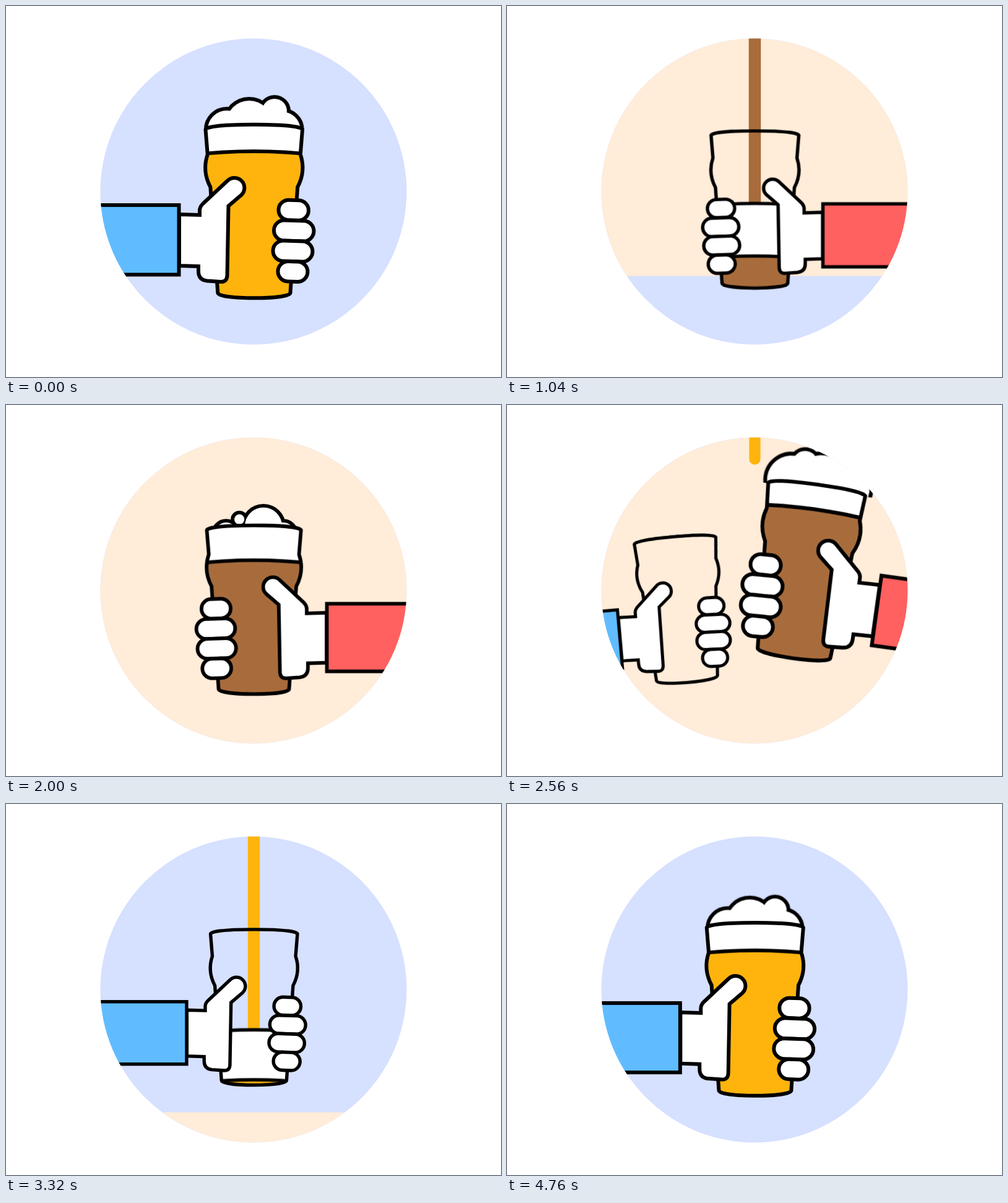
An HTML page without scripts for the animation above (4.8 s loop, 800x600 px).

```html
<!DOCTYPE html>
<html lang="en">
<head>
<meta charset="utf-8">
<title>Pouring two beers</title>
<style>
  html, body { margin: 0; width: 100%; height: 100%; overflow: hidden; background: #fff; }
  svg { display: block; width: 100vw; height: 100vh; }

  .amber { --drink: #feb40d; --sleeve: #60bcff; }
  .brown { --drink: #a86c3c; --sleeve: #ff6060; }

  .backdrop, .round, .grow, .stream, .foam, .liquid, .fingers, circle {
    animation: 4800ms linear infinite;
  }
  /* the amber beer runs half a loop ahead */
  .amber, .amber * { animation-delay: -2400ms !important; }

  .ink { stroke: #000; stroke-width: 6; }
  .skin { fill: #fff; }
  .sleeve { fill: var(--sleeve); }

  .backdrop { animation-name: wipe; }
  .grow { transform-origin: 400.5px 300px; animation-name: grow; }
  .round { transform-origin: 400.5px 300px; animation-name: round; }
  .fingers { animation-name: grip; }
  .stream {
    fill: none; stroke: var(--drink); stroke-width: 21.6; stroke-linecap: round;
    stroke-dasharray: 475 1200; animation-name: pour;
  }
  .foam { fill: #fff; animation-name: foam; }
  .liquid { fill: var(--drink); animation-name: liquid; }
  .edge { fill: #000; stroke: #000; stroke-width: 12; }
  .froth { fill: #fff; }
  .b1 { animation-name: b1; }
  .b2 { animation-name: b2; }
  .b3 { animation-name: b3; }
  .b4 { animation-name: b4; }

  @keyframes wipe {
    0% { transform: translateY(-496px); }
    13.354% { transform: translateY(-496px); animation-timing-function: cubic-bezier(.4, 0, .2, 1); }
    30.02%  { transform: none; }
    58.625% { transform: none; animation-timing-function: cubic-bezier(.4, 0, .2, 1); }
    75.29%, 100% { transform: translateY(496px); }
  }
  @keyframes grow {
    from { scale: .8333; }
    to   { scale: 1.1667; }
  }
  @keyframes grip {
    from { translate: -6px 0; }
    to   { translate: 6px 0; }
  }
  /* swing in empty, stay to be filled, lift away */
  @keyframes round {
    0% { translate: -399px 13px; rotate: -16.2deg; animation-timing-function: cubic-bezier(.333, .667, .667, 1); }
    7.5% { translate: 0px 0px; rotate: 0deg; }
    50% { translate: 0px 0px; rotate: 0deg; animation-timing-function: cubic-bezier(.333, 0, .667, .333); }
    58.333%, 100% { translate: -531px -388px; rotate: -48.75deg; }
  }
  @keyframes pour {
    0%, 2.52% { stroke-dashoffset: 475; }
    8.333%, 36.25% { stroke-dashoffset: 0; }
    41.667%, 100% { stroke-dashoffset: -475; }
  }
  @keyframes foam {
    0%, 12.5% { transform: translateY(485px); }
    15.833% { transform: translateY(430px); }
    19.167% { transform: translateY(373px); }
    21.667% { transform: translateY(321.5px); }
    25%     { transform: translateY(272px); }
    29.167% { transform: translateY(231px); }
    32.5%   { transform: translateY(213px); }
    35.833% { transform: translateY(202.4px); }
    38.333% { transform: translateY(191px); }
    41.667%, 100% { transform: translateY(176px); }
  }
  @keyframes liquid {
    0%, 16.667% { transform: translateY(485px); }
    19.167% { transform: translateY(463px); }
    21.667% { transform: translateY(415.4px); }
    25%     { transform: translateY(358px); }
    29.167% { transform: translateY(311px); }
    32.5%   { transform: translateY(286px); }
    35.833% { transform: translateY(268.5px); }
    41.667% { transform: translateY(249.6px); }
    50%     { transform: translateY(235px); }
    56.667%, 100% { transform: translateY(228px); }
  }
  @keyframes b1 {
    0%, 36.25% { cx: 352px; cy: 232px; r: 17px; }
    41.667% { cx: 352px; cy: 206px; r: 19px; }
    50%     { cx: 357px; cy: 200px; r: 31px; }
    53.333%, 100% { cx: 358px; cy: 192px; r: 41px; }
  }
  @keyframes b2 {
    0%, 36.25% { cx: 385px; cy: 232px; r: 27px; }
    41.667% { cx: 385px; cy: 193px; r: 31px; }
    50%     { cx: 393px; cy: 190px; r: 37px; }
    53.333%, 100% { cx: 395px; cy: 188px; r: 44px; }
  }
  @keyframes b3 {
    0%, 36.25% { cx: 425px; cy: 215px; r: 7px; }
    41.667% { cx: 425px; cy: 181.7px; r: 8.3px; }
    50%     { cx: 434px; cy: 170px; r: 20px; }
    53.333%, 100% { cx: 425px; cy: 161px; r: 20px; }
  }
  @keyframes b4 {
    0%, 36.25% { cx: 447px; cy: 232px; r: 17px; }
    41.667% { cx: 447px; cy: 206px; r: 19px; }
    50%     { cx: 447px; cy: 200px; r: 28.6px; }
    53.333%, 100% { cx: 443px; cy: 190px; r: 39px; }
  }
</style>
</head>
<body>
<svg viewBox="0 0 800 600">
  <defs>
    <clipPath id="disc"><ellipse cx="400" cy="300" rx="247.5" ry="247.5"/></clipPath>
    <path id="glass" stroke-linejoin="round" d="M322.6 200.5C321 196 342 191.7 400.8 191.7S480.6 196 479 200.5L475.8 240Q485 267 471.2 293L459.5 464C459 475 342.5 475 342.3 464L330.4 293Q316.6 267 325.8 240Z"/>
    <clipPath id="inside"><use href="#glass"/></clipPath>
    <clipPath id="above"><path d="M0 0H800V200.5H479C480.6 196 459.6 191.7 400.8 191.7S321 196 322.6 200.5H0Z"/></clipPath>
    <path id="surface" d="M300 6Q400.8 -6 501 6V320H300Z"/>
    <g id="hand" class="ink skin">
      <path d="M280 337L313 338V331Q313 325 318 320L358 282.5A16 16 0 0 1 380.5 305.5L359.5 323.5L357.5 436Q357 446.5 347 446L325 444.5Q311 443 311 429V421L280 420Z"/>
      <rect class="sleeve" x="-400" y="322" width="679.5" height="112.5"/>
    </g>
    <g id="fingers" class="ink skin">
      <rect x="440.5" y="314" width="48.5" height="32.5" rx="16.2" transform="rotate(2 465 330)"/>
      <rect x="433" y="347" width="64.5" height="33" rx="16.5" transform="rotate(2 465 363)"/>
      <rect x="431.5" y="380" width="64" height="33" rx="16.5" transform="rotate(2 464 396)"/>
      <rect x="439.5" y="413.3" width="48" height="32.5" rx="16.2" transform="rotate(2 464 429)"/>
    </g>
  </defs>

  <g clip-path="url(#disc)">
    <rect x="150" y="50" width="500" height="500" fill="#d6e0ff"/>
    <rect class="backdrop" x="150" y="52" width="500" height="496" fill="#ffecd9"/>

    <g class="brown">
      <g class="grow"><path class="stream" d="M400.5 -20V455"/></g>
    </g>
    <g class="amber">
      <g class="grow"><path class="stream" d="M400.5 -20V455"/></g>
    </g>

    <g class="amber">
      <g class="round"><g class="grow">
        <g clip-path="url(#above)">
          <g class="edge"><circle class="b1"/><circle class="b2"/><circle class="b3"/><circle class="b4"/></g>
          <g class="froth"><circle class="b1"/><circle class="b2"/><circle class="b3"/><circle class="b4"/></g>
        </g>
        <g clip-path="url(#inside)">
          <use class="foam ink" href="#surface"/>
          <use class="liquid ink" href="#surface"/>
        </g>
        <use class="ink" href="#glass" fill="none"/>
        <use href="#hand"/>
        <use class="fingers" href="#fingers"/>
      </g></g>
    </g>

    <g class="brown" transform="translate(801.5) scale(-1 1)">
      <g class="round"><g class="grow">
        <g clip-path="url(#above)">
          <g class="edge"><circle class="b1"/><circle class="b2"/><circle class="b3"/><circle class="b4"/></g>
          <g class="froth"><circle class="b1"/><circle class="b2"/><circle class="b3"/><circle class="b4"/></g>
        </g>
        <g clip-path="url(#inside)">
          <use class="foam ink" href="#surface"/>
          <use class="liquid ink" href="#surface"/>
        </g>
        <use class="ink" href="#glass" fill="none"/>
        <use href="#hand"/>
        <use class="fingers" href="#fingers"/>
      </g></g>
    </g>
  </g>
</svg>
</body>
</html>
```
